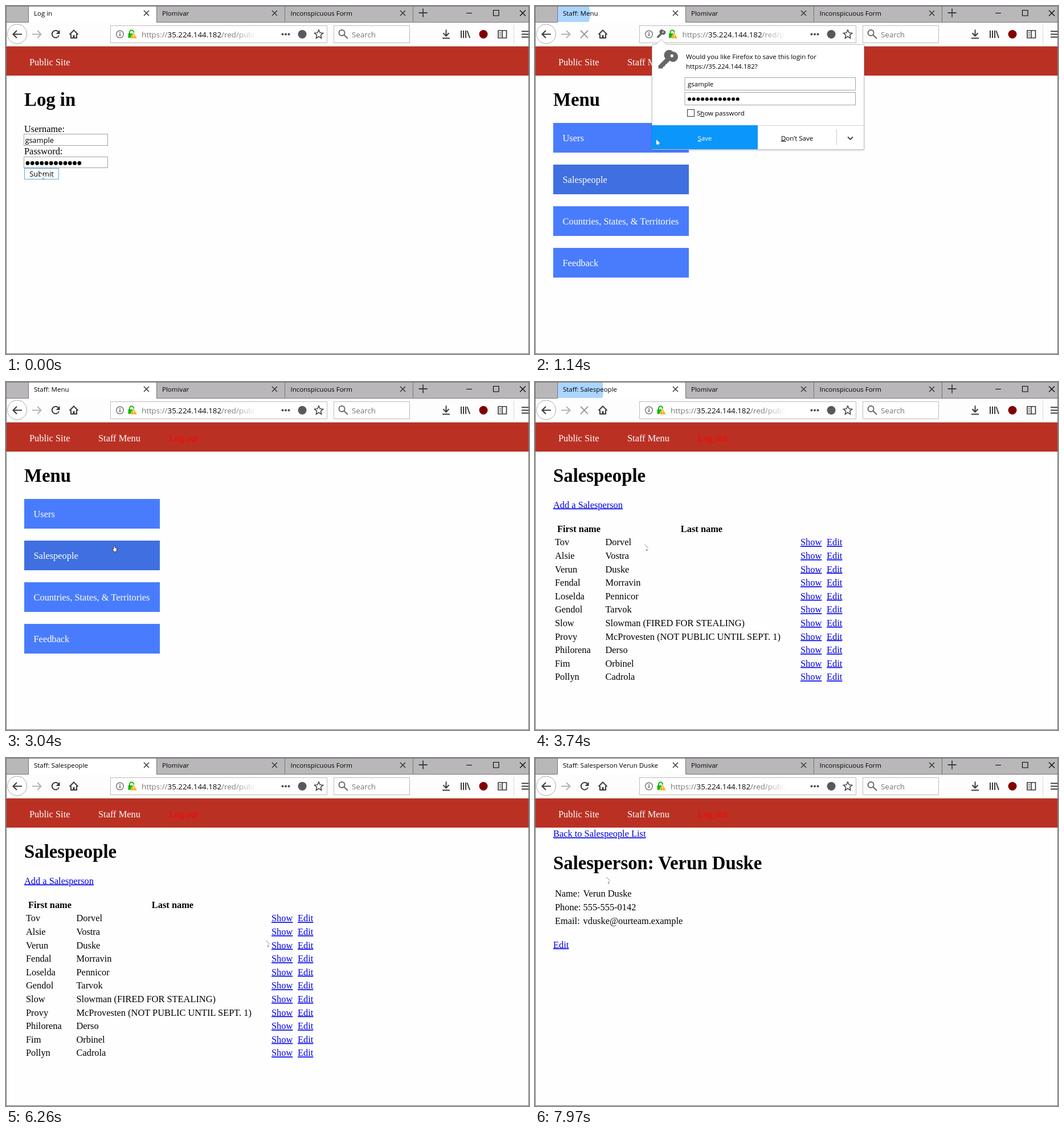
An HTML page for the animation above (8 s loop, 918 px wide and 610 px high).

```html
<!DOCTYPE html>
<html lang="en">
<head>
<meta charset="utf-8">
<title>Log in</title>
<style>
  html, body { margin: 0; width: 100%; height: 100%; overflow: hidden; background: #fff; }
  svg { display: block; font-family: "Liberation Serif", serif; font-size: 16.4px; white-space: pre; }
  .ui { font-family: "Open Sans", sans-serif; font-size: 11.5px; }
  .field { font-family: "Open Sans", sans-serif; font-size: 12.8px; }
  .bar { font-family: "Open Sans", sans-serif; font-size: 13.35px; fill: #777; }
  .h1 { font-size: 32.8px; font-weight: bold; }
  .bold { font-weight: bold; }
  .mid { text-anchor: middle; }
  .white { fill: #fff; }
  .link { fill: #00e; text-decoration: underline; }
  .line { fill: none; stroke: #3d3d3f; stroke-width: 2; }
  .u { text-decoration: underline; }
</style>
</head>
<body>
<svg id="stage" width="918" height="610" viewBox="0 0 918 610"></svg>
<script>
const text = (x, y, s, cls = '') => `<text x="${x}" y="${y}" class="${cls}">${s}</text>`;
const rect = (x, y, w, h, fill, more = '') =>
  `<rect x="${x}" y="${y}" width="${w}" height="${h}" fill="${fill}" ${more}/>`;
const path = (d, more = '') => `<path class="line" d="${d}" ${more}/>`;
const thin = 'style="stroke-width:1.2"';
const cross = (x, y, r, more) => path(`M${x - r} ${y - r}l${2 * r} ${2 * r}m0 ${-2 * r}l${-2 * r} ${2 * r}`, more);
const box = (x, y, w, h, stroke = '#a3a3a3', fill = '#fff') => rect(x, y, w, h, fill, `stroke="${stroke}"`);
const group = (id, body, more = '') => `<g id="${id}" ${more}>${body}</g>`;
const list = (n, f) => Array.from({ length: n }, (_, i) => f(i)).join('');
const dots = (x, y, pitch, r) => list(12, i => `<circle cx="${x + i * pitch}" cy="${y}" r="${r}"/>`);

const people = ['Tov Dorvel', 'Alsie Vostra', 'Verun Duske', 'Fendal Morravin', 'Loselda Pennicor',
  'Gendol Tarvok', 'Slow Slowman (FIRED FOR STEALING)', 'Provy McProvesten (NOT PUBLIC UNTIL SEPT. 1)',
  'Philorena Derso', 'Fim Orbinel', 'Pollyn Cadrola'];
const user = 'gsample', host = '35.224.144.182';
const titles = ['Log in', 'Staff: Menu', 'Staff: Salespeople', 'Staff: Salesperson Verun Duske'];

const tabs =
  rect(0, 0, 918, 29, '#bab7ba') + rect(40, 1, 224, 28, '#fff') +
  group('burst', '<circle id="wave" cx="57" cy="14" fill="#0a84ff"/>', 'clip-path="url(#tab)"') +
  path('M39.5 0V28.5H0M264.5 0V28.5H918M489.5 0V28M714.5 0V28', 'style="stroke:#77747a;stroke-width:1"') +
  `<text id="title" x="49" y="17" class="ui"></text>` +
  text(274, 17, 'Plomivar', 'ui') + text(499.5, 17, 'Inconspicuous Form', 'ui') +
  [246.5, 471.5, 696.5].map(x => cross(x, 12.5, 4.5, 'style="stroke-width:1.6"')).join('') +
  path('M724.5 12H739.5M732 4.5V19.5', 'style="stroke-width:1.8"') +
  path('M808 12.5H818M855.5 7.5h9.5v9.5h-9.5z', 'style="stroke:#000;stroke-width:1.1"') +
  cross(907, 12.5, 5, 'style="stroke:#000;stroke-width:1.1"');

const key = '<path fill-rule="evenodd" fill="#666" d="M27 1a9.5 9.5 0 1 1-6 17L15 24l-2 1-1 3-3 1-1 3H0V27L13 14A9.5 9.5 0 0 1 27 1zM25 6a2.8 2.8 0 1 0 .1 0z" transform="scale(.95)"/>';

const toolbar =
  rect(0, 29, 918, 42, '#fdfdfd') + rect(0, 70, 918, 1, '#d0cfd0') +
  '<circle cx="19.5" cy="49" r="17" fill="#fff" stroke="#aaa"/>' +
  path('M28 49.500H13M19 43L12.500 49.500L19 56') +
  path('M46 49.500H61M55 43L61.500 49.500L55 56', 'style="stroke:#b4b4b4"') +
  group('reload', path('M92.500 46A6.300 6.300 0 1 0 93 51.500') + '<path d="M94.500 42v7h-7z" fill="#3d3d3f"/>') +
  group('stop', cross(86.5, 49.5, 6.5, 'style="stroke:#9b9b9b"')) +
  path('M111.500 50L119 42.500L126.500 50M114 49V56H124V49') + rect(117.5, 51, 3, 5, '#3d3d3f') +
  box(183.5, 34.5, 380, 30, '#bcbcbc') +
  `<circle cx="200" cy="49.500" r="6.300" class="line" style="stroke:#666;stroke-width:1.300"/>` +
  rect(199.2, 48, 1.7, 5, '#666') + rect(199.2, 45.5, 1.7, 1.6, '#666') +
  group('smallKey', `<g transform="translate(214 42) scale(.45)">${key}</g>`) +
  group('address',
    path('M217 49V46A3.500 3.500 0 0 1 224 46V49', 'style="stroke:#12bc00"') + rect(214.5, 48, 11, 8, '#12bc00') +
    '<path d="M224 46.500L230 57H218z" fill="#ffa400" stroke="#fff" stroke-width=".8"/>' +
    rect(223.4, 50, 1.3, 3.5, '#fff') + rect(223.4, 54.3, 1.3, 1.3, '#fff') +
    text(238, 55, `https://<tspan fill="#0c0c0d">${host}</tspan>/red/publi`, 'bar')) +
  rect(398, 40, 82, 20, 'url(#fade)') +
  [485.5, 491, 496.5].map(x => `<circle cx="${x}" cy="49.500" r="2" fill="#4a4a4c"/>`).join('') +
  '<circle cx="520" cy="49.500" r="7.500" fill="#58585a"/>' +
  path('M549 42l2.200 4.900 5.300.6-4 3.600 1.100 5.300-4.600-2.700-4.600 2.700 1.100-5.300-4-3.600 5.300-.6z', 'style="stroke-width:1.500"') +
  box(575.5, 34.5, 133, 30, '#bcbcbc') +
  '<circle cx="589.500" cy="47" r="5" class="line" style="stroke:#666"/>' + path('M593 50.500L600 57', 'style="stroke:#666"') +
  text(607, 55, 'Search', 'bar') +
  path('M772.500 41.500V52M767.500 47.500L772.500 52.500L777.500 47.500M766 56.500H779') +
  path('M799 43V56M803 43V56M807 43V56M809.500 43.500L814 56') +
  '<circle cx="838" cy="49.500" r="7.500" fill="#800000"/>' +
  path('M864 43h14.500v13h-14.500zM871 43V56', 'style="stroke-width:1.700"') + path('M866 46.500h3m-3 3h3m-3 3h3', thin) +
  rect(891, 33, 1, 33, '#d7d7d7') + path('M905 44.500H918M905 49.500H918M905 54.500H918');

const login =
  text(32, 175, 'Log in', 'h1') + text(32, 220.5, 'Username:') + box(31.5, 224.5, 147, 20) +
  text(33.5, 239.5, user, 'field') + text(32, 260, 'Password:') + box(31.5, 264.5, 147, 19) +
  dots(38, 275.5, 8.25, 3.4) + rect(32.5, 284.5, 60, 19, '#fff', 'id="submit" stroke="#5aaae8"') +
  text(62.5, 299, 'Submit', 'field mid');

const menu = text(32, 175, 'Menu', 'h1') +
  ['Users', 'Salespeople', 'Countries, States, &amp; Territories', 'Feedback'].map((s, i) =>
    rect(32, 205 + 73 * i, 238, 52, '#497cfc', `id="item${i}"`) + text(48.5, 236.5 + 73 * i, s, 'white')).join('');

const table = text(32, 175, 'Salespeople', 'h1') + text(32, 220.5, 'Add a Salesperson', 'link') +
  text(77, 262.5, 'First name', 'bold mid') + text(292.5, 262.5, 'Last name', 'bold mid') +
  people.map((s, i) => {
    const y = 286.3 + 23.6 * i, [first, ...last] = s.split(' ');
    return text(35, y, first) + text(123.5, y, last.join(' ')) + text(466, y, 'Show', 'link') + text(512, y, 'Edit', 'link');
  }).join('');

const details = text(32, 138, 'Back to Salespeople List', 'link') +
  text(32, 195, 'Salesperson: Verun Duske', 'h1') +
  [['Name:', 'Verun Duske'], ['Phone:', '555-555-0142'], ['Email:', 'vduske@ourteam.example']].map(([k, v], i) =>
    text(35, 243.3 + 23.6 * i, k) + text(84.5, 243.3 + 23.6 * i, v)).join('') +
  text(32, 332.5, 'Edit', 'link');

const popup =
  '<path d="M205.500 67.500H212L221.500 58.500L231 67.500H577.500V251.500H205.500z" fill="#fff" stroke="#c4c4c4" filter="url(#shadow)"/>' +
  `<g transform="translate(216.500 79)">${key}</g>` +
  text(265, 92.5, 'Would you like Firefox to save this login for', 'ui') + text(265, 109.5, `https://${host}?`, 'ui') +
  box(263, 125.5, 299.5, 22) + text(268, 141, user, 'ui') + box(263, 151.5, 299.5, 22) + dots(271, 163.2, 7.7, 3) +
  box(267.5, 181.5, 12, 12, '#333') + text(284, 192, 'S<tspan class="u">h</tspan>ow password', 'ui') +
  rect(205, 209, 186, 42, '#0a96fb') + rect(391, 209, 186, 1, '#d4d4d4') +
  rect(391, 209, 138, 42, '#e5e5e5', 'id="refuse"') + rect(529, 216, 1, 28, '#ccc') +
  text(298, 235.5, '<tspan class="u">S</tspan>ave', 'ui mid white') +
  text(460, 235.5, '<tspan class="u">D</tspan>on’t Save', 'ui mid') +
  path('M549 229.500L553.500 234L558 229.500', 'style="stroke-width:1.800"');

const cursor =
  group('arrow', '<path d="M0 0V9.500L2.200 7.500L3.700 11L5.200 10.400L3.800 7H6.800z" fill="#fff"/>' +
    path('M.5 0L6.800 6.500M3.900 7.200L5.300 10.300L3.800 11L3 9', 'style="stroke:#777;stroke-width:.9"')) +
  group('hand', '<path d="M2 1Q3 0 4 1V4L7.500 5.500V8L6.500 11.500H2.500L0 7.500V6L2 7z" fill="#fff" stroke="#222" stroke-width=".8"/>');

const stage = document.getElementById('stage');
stage.innerHTML = `<defs>
  <clipPath id="tab">${rect(40, 1, 224, 27)}</clipPath>
  <linearGradient id="fade"><stop stop-color="#fff" stop-opacity="0"/><stop offset=".52" stop-color="#fff"/></linearGradient>
  <filter id="shadow"><feDropShadow dx="0" dy="1" stdDeviation="1.500" flood-opacity=".2"/></filter></defs>` +
  rect(0, 0, 918, 610, '#fefefe') + tabs + toolbar + rect(0, 71, 918, 51, '#ba3124') +
  text(41, 104, 'Public Site', 'white') +
  group('staff', text(162, 104, 'Staff Menu', 'white') + text(286, 104, 'Log out', '" fill="#f00')) +
  [login, menu, table, details].map((body, i) => group('page' + i, body)).join('') +
  group('popup', popup) + rect(.5, .5, 917, 609, 'none', 'stroke="#747474"') + group('cursor', cursor);

const $ = id => document.getElementById(id);
const show = (id, on) => $(id).setAttribute('display', on ? 'inline' : 'none');

// Pointer moves: start, end, steps, target x, target y
const moves = [
  [720, 1140, 4, 213, 234], [1290, 1290, 1, 258, 236], [1450, 2020, 5, 465, 231], [2760, 3040, 3, 187, 286],
  [3590, 3740, 2, 192, 285], [3880, 4280, 4, 266, 382], [4430, 4560, 2, 275, 411], [4980, 5410, 4, 77, 328],
  [5550, 5980, 4, 313, 304], [6110, 6260, 2, 456, 320], [6400, 6690, 3, 489, 324], [7540, 7970, 4, 125, 209]];

function pointer(t) {
  let x = 61, y = 293;
  for (const [start, end, n, tx, ty] of moves) {
    if (t < start) break;
    const k = end > start ? Math.min(n, Math.floor((t - start) / (end - start) * (n - 1) + 1e-6) + 1) / n : 1;
    x += (tx - x) * k;
    y += (ty - y) * k;
  }
  return [x, y];
}

const loads = [
  { start: 430, page: 860, burst: 1140, end: 1740, radius: 40 },
  { start: 3460, page: 3600, burst: 3740, end: 4280, radius: 63 },
  { start: 7250, page: 7400, burst: 7540, end: 7970, radius: 50 }];

function draw() {
  const t = performance.now() % 8000;
  const [x, y] = pointer(t);
  const page = loads.filter(l => t >= l.page).length;
  const asking = t >= 1000 && t < 2450;
  titles.forEach((_, i) => show('page' + i, i === page));
  $('title').textContent = titles[page];
  show('staff', page > 0);

  const load = loads.find(l => t >= l.start && t < l.end);
  show('stop', load);
  show('reload', !load);
  const step = load ? Math.floor((t - load.burst) / 145) : -1;
  show('burst', step >= 0 && step < 3);
  if (step >= 0) {
    $('wave').setAttribute('r', load.radius + 85 * step);
    $('wave').setAttribute('opacity', Math.max(0, .34 - .13 * step));
  }

  show('popup', asking);
  show('smallKey', asking);
  $('address').setAttribute('transform', `translate(${asking ? 20.5 : 0})`);
  show('refuse', x >= 391 && x < 529);
  $('submit').setAttribute('fill', t >= 280 && t < 430 ? '#cce4f7' : '#fff');

  const onMenu = page === 1 && !asking && x < 270 && y >= 278 && y < 330;
  $('item1').setAttribute('fill', onMenu || t < 1290 ? '#3f6fe0' : '#497cfc');
  const hand = onMenu || page === 2 && x >= 466;
  show('hand', hand);
  show('arrow', !hand);
  $('cursor').setAttribute('transform', `translate(${x} ${y})`);
  requestAnimationFrame(draw);
}
draw();
</script>
</body>
</html>
```
